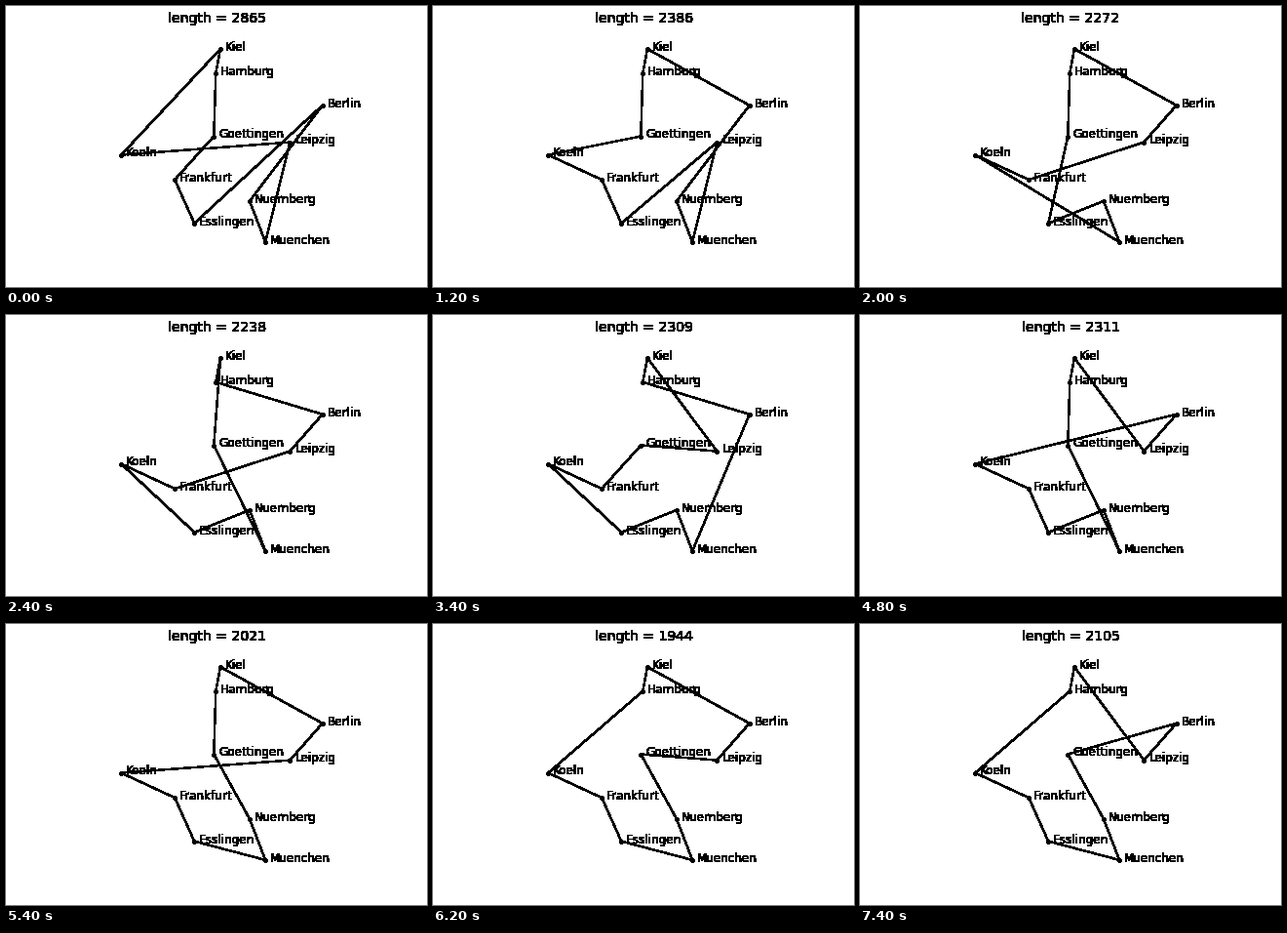
Write a matplotlib script that moves like this. It is 432 px wide and 288 px high and loops after 8000 ms.

```python
import matplotlib.pyplot as plt
from matplotlib.animation import FuncAnimation

W, H, DPI = 432, 288, 72
STEP_MS, STEPS = 200, 40

CITIES = {
    "Kiel": (220.0, 44.0),
    "Hamburg": (215.3, 68.8),
    "Berlin": (324.7, 101.8),
    "Goettingen": (213.3, 133.5),
    "Leipzig": (291.4, 139.6),
    "Koeln": (118.2, 152.6),
    "Frankfurt": (173.2, 178.1),
    "Nuernberg": (250.0, 199.9),
    "Esslingen": (193.3, 222.7),
    "Muenchen": (266.2, 241.9),
}
# One letter per city, O for Koeln.
BY_KEY = dict(zip("KHBGLOFNEM", CITIES.values()))

# The search reverses one stretch of the tour at a time: (first step, tour, km).
TOURS = [
    (0, "KHGFEBNMLO", 2865),
    (3, "KHGFELMNBO", 2814),
    (4, "KHGBNMLEFO", 2570),
    (6, "KHGOFELMNB", 2386),
    (7, "KHGLEFOMNB", 2437),
    (8, "KHGELFOMNB", 2713),
    (10, "KHGENMOFLB", 2272),
    (11, "KHBLFOMNEG", 2316),
    (12, "KHBLFOENMG", 2238),
    (13, "KHBLGMNEOF", 2285),
    (14, "KHBFOENMGL", 2445),
    (17, "KHBMNEOFGL", 2309),
    (18, "KHGFOENMBL", 2256),
    (20, "KHBMNEOFGL", 2309),
    (22, "KHBFOENMGL", 2445),
    (23, "KHGMNEOFBL", 2392),
    (24, "KHGMNEFOBL", 2311),
    (26, "KHGMNEFOLB", 2144),
    (27, "KHGNMEFOLB", 2021),
    (31, "KHOFEMNGLB", 1944),
    (37, "KHOFEMNGBL", 2105),
]


def harden(img, dpi):
    """Turn every touched pixel solid black."""
    img[..., :3] = 0
    img[..., 3] = img[..., 3] > 0
    return img, 0, 0


plt.rcParams["font.family"] = "DejaVu Sans"
fig = plt.figure(figsize=(W / DPI, H / DPI), dpi=DPI, facecolor="white")
ax = fig.add_axes([0, 0, 1, 1])
ax.set_xlim(0, W)
ax.set_ylim(H, 0)
ax.axis("off")
ax.set_agg_filter(harden)

route, = ax.plot([], [], "k.-", lw=1.5, ms=6)
title = ax.text(216, 17, "", fontsize=14, ha="center", va="baseline")
for name, (x, y) in CITIES.items():
    ax.text(x + 5, y + 1.8, name, fontsize=12, va="baseline")


def update(step):
    _, tour, km = [t for t in TOURS if t[0] <= step][-1]
    xs, ys = zip(*(BY_KEY[c] for c in tour + tour[0]))
    route.set_data(xs, ys)
    title.set_text(f"length = {km}")
    return route, title


anim = FuncAnimation(fig, update, frames=STEPS, interval=STEP_MS,
                     repeat=True, repeat_delay=0, blit=False)
plt.show()
```
